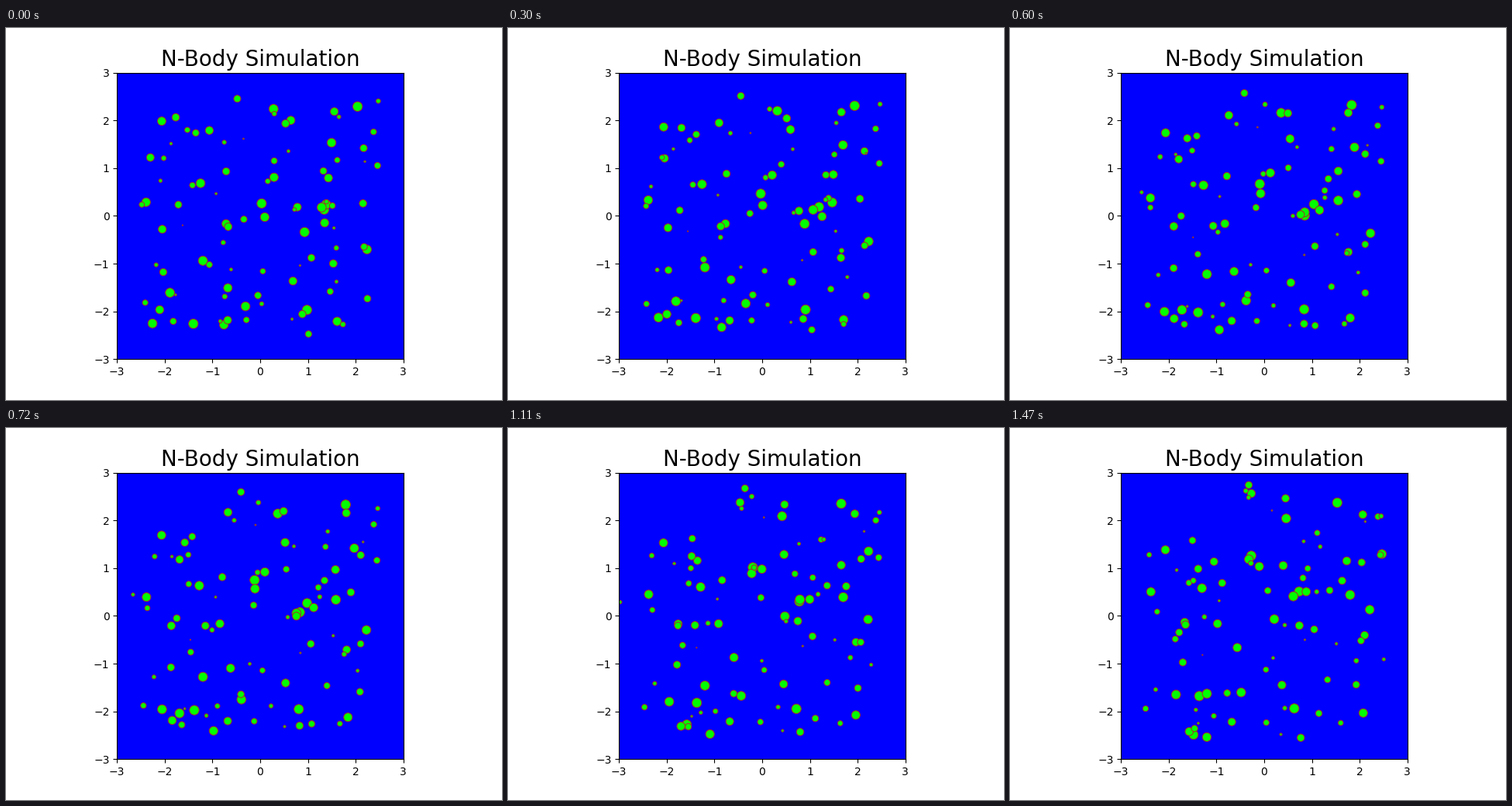
A matplotlib script for the animation above (1500 ms loop, 640 px wide and 480 px high).

```python
import numpy as np
import matplotlib.pyplot as plt
from matplotlib.animation import FuncAnimation

FRAMES = 50
INTERVAL = 30
COUNT = 96
MAX_AREA = 80
HALF_BOX = 2.5
SPREAD = np.array([0.7549, 0.5698])  # steps that fill the square evenly

# The heaviest bodies: start x, start y, total drift x, total drift y.
LEADERS = np.array([
    (2.04, 2.29, -0.51, 0.08), (-1.40, -2.26, 0.04, 0.58),
    (0.98, -1.97, -0.35, 0.03), (0.03, 0.26, -0.30, 1.00),
    (0.93, -0.34, -0.20, 0.85), (1.34, 0.13, -0.73, 0.28),
    (1.38, 0.24, 0.42, 0.20), (-1.20, -0.94, 0.00, -0.69),
    (-1.89, -1.61, 0.41, -0.88), (0.28, 2.24, 0.18, -0.20),
])


def make_bodies():
    """Return start positions and total drift, heaviest body first."""
    rng = np.random.default_rng(5)
    others = COUNT - len(LEADERS)
    steps = np.arange(others)[:, None] * SPREAD
    cells = (steps + rng.uniform(-0.08, 0.08, (others, 2))) % 1
    start = np.vstack([LEADERS[:, :2], HALF_BOX * (2 * cells - 1)])
    drift = np.vstack([LEADERS[:, 2:], rng.normal(0, 0.45, (others, 2))])
    return start, drift


start, drift = make_bodies()
areas = MAX_AREA * (1 - np.arange(COUNT) / COUNT)

fig, ax = plt.subplots(figsize=(6.4, 4.8), dpi=100)
ax.set_facecolor("blue")
ax.set_aspect("equal")
ax.set_xlim(-3, 3)
ax.set_ylim(-3, 3)
ax.set_xticks(range(-3, 4))
ax.set_yticks(range(-3, 4))
ax.set_title("N-Body Simulation", fontsize=20)
dots = ax.scatter(start[:, 0], start[:, 1], s=areas, c="lime",
                  edgecolors="brown", linewidths=0.7)


def update(frame):
    dots.set_offsets(start + drift * frame / (FRAMES - 1))
    return (dots,)


anim = FuncAnimation(fig, update, frames=FRAMES, interval=INTERVAL,
                     repeat=True, repeat_delay=0)
plt.show()
```
